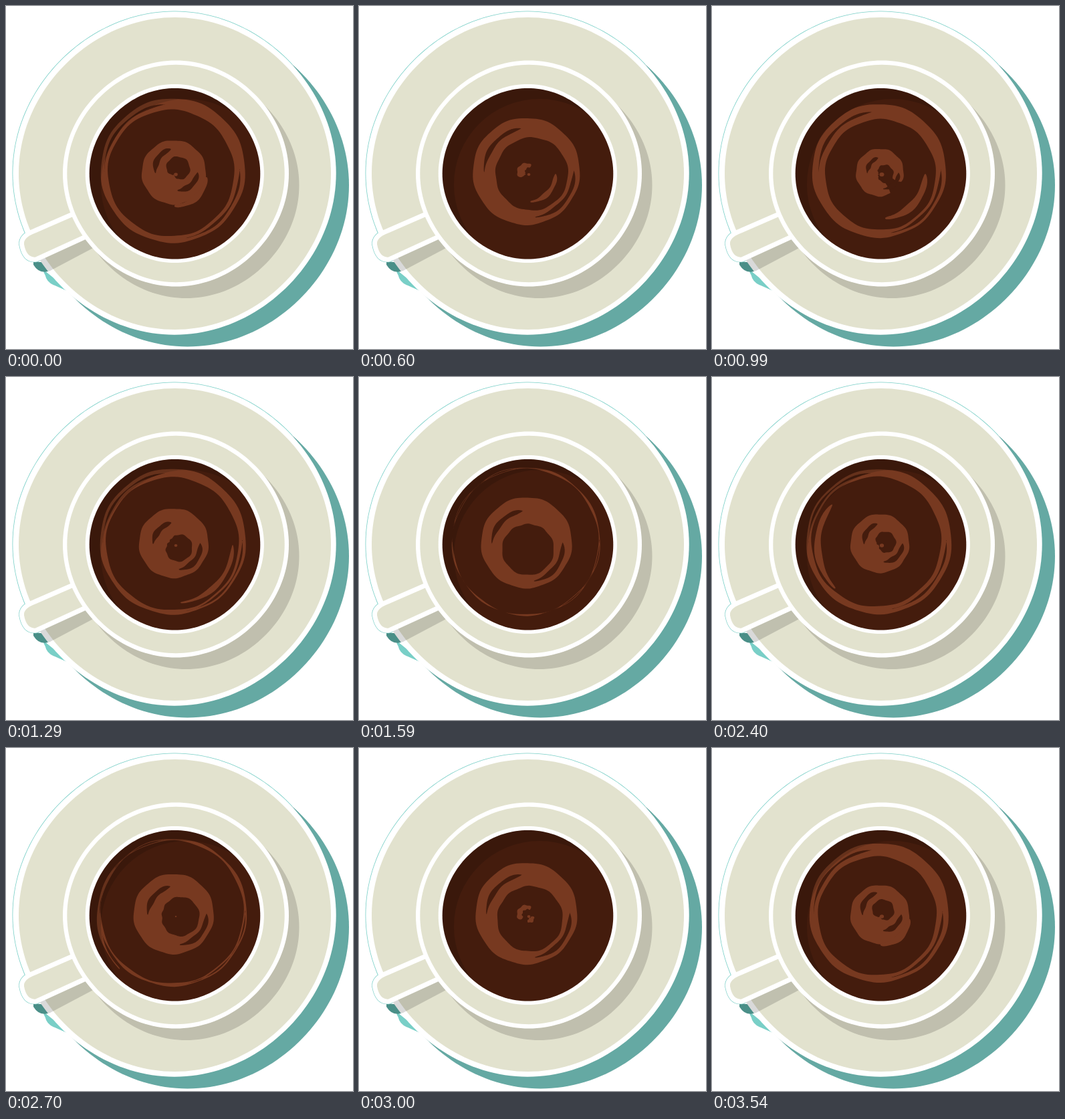
An HTML page with a canvas that plays this animation: 519x513 px, repeating every 3.57 s.

```html
<!DOCTYPE html>
<html>
<head>
<meta charset="utf-8">
<style>
html, body { margin: 0; width: 100%; height: 100%; overflow: hidden; background: #fff; }
canvas { display: block; }
</style>
</head>
<body>
<canvas id="stage" width="519" height="513"></canvas>
<script>
const ctx = document.getElementById('stage').getContext('2d');
const LOOP = 3570, STEPS = 48, LIFE = 34;
const CX = 252, CY = 251, RAD = Math.PI / 180;
const CREAM = '#e2e2ce', COFFEE = '#441c0d', FOAM = '#773920';
const TEAL = '#65a9a3', DEEP_TEAL = '#4a8f88', AQUA = '#79cfc7';

// born: step of birth; thick: heavy side of the ring in degrees;
// wisp: angle and radius of the loose arc that drifts outwards.
const swirls = [
  { born: 4, thick: 285, wisp: { angle: 42, radius: 22 } },
  { born: 21, thick: 245, wisp: { angle: 178, radius: 39 } },
  { born: 36, thick: 205, wisp: { angle: 48, radius: -12 } }
];

// Fills the area between two radius functions of u (0..1) and the angle.
function band(middle, span, outer, inner, color) {
  const N = 120, rim = [], core = [];
  for (let i = 0; i <= N; i++) {
    const u = i / N, a = (middle + span * (u - 0.5)) * RAD;
    const at = r => [CX + r * Math.cos(a), CY + r * Math.sin(a)];
    const handDrawn = 0.7 * Math.sin(9 * a);
    rim.push(at(Math.max(0, outer(u, a) + handDrawn)));
    core.unshift(at(Math.max(0, inner(u, a) - handDrawn)));
  }
  ctx.beginPath();
  for (const p of rim.concat(core)) ctx.lineTo(...p);
  ctx.fillStyle = color;
  ctx.fill();
}

// A crescent with pointed ends around a radius function.
function crescent(middle, span, radius, width, color) {
  const half = u => width / 2 * Math.sqrt(Math.sin(Math.PI * u));
  band(middle, span, (u, a) => radius(a) + half(u), (u, a) => radius(a) - half(u), color);
}

function drawSwirl({ thick, wisp }, age) {
  const size = Math.min(4 * age, 108 + (age - 27) / 2);
  const weight = Math.min(0.7 * size, 34 * Math.sin(Math.PI * (age / LIFE) ** 0.6));
  const heavy = (thick + 9 * (age - 20)) * RAD;
  const opening = Math.min(1, age / 10);

  // ring: a short arc that closes while it grows
  const outer = a => size * (1 + 0.05 * Math.cos(a - 245 * RAD));
  const depth = a => weight * (1 + 0.35 * Math.cos(a - heavy));
  const middle = a => outer(a) - depth(a) / 2;
  const taper = u => Math.max(0, Math.sin(Math.PI * u)) ** (0.5 * (1 - opening));
  const half = (u, a) => depth(a) / 2 * taper(u);
  band(222, 360 * opening,
    (u, a) => middle(a) + half(u, a), (u, a) => middle(a) - half(u, a), FOAM);

  // two slits split the ring at the upper left and lower right
  if (age > 7) {
    crescent(222, 80, middle, weight * 0.26, COFFEE);
    crescent(38, 84, middle, weight * 0.26, COFFEE);
  }

  if (age < 17) {
    const fade = Math.sin(Math.PI * age / 17);
    crescent(wisp.angle, 84, () => wisp.radius + 5 * age, 11 * fade, FOAM);
    disc(CX + 2, CY + 1, 3.5 * fade, 3 * fade, FOAM);
  }
}

function disc(x, y, rx, ry, color) {
  ctx.beginPath();
  ctx.ellipse(x, y, rx, ry, 0, 0, 7);
  ctx.fillStyle = color;
  ctx.fill();
}

// Hand-cut circle, slightly flat along the diagonals.
function oval(x, y, r) {
  const path = new Path2D();
  for (let deg = 0; deg < 360; deg += 2) {
    const a = deg * RAD, q = r * (1 - 0.005 * (1 - Math.cos(4 * a)));
    path.lineTo(x + q * Math.cos(a), y + q * Math.sin(a));
  }
  path.closePath();
  return path;
}

function paint(path, fill, stroke, width) {
  if (stroke) {
    ctx.strokeStyle = stroke;
    ctx.lineWidth = width;
    ctx.lineJoin = 'round';
    ctx.stroke(path);
  }
  if (fill) {
    ctx.fillStyle = fill;
    ctx.fill(path);
  }
}

const saucer = oval(252, 250, 241.7);
const coffee = oval(252.5, 250.7, 127.8);
const handle = new Path2D('M112 306L42 336.5Q22 344 23.5 357Q28 381 45 379L128 341');
const handleShade = new Path2D('M44 382L116 347L134 360L66 396Q50 402 44 382Z');

function drawCup() {
  ctx.fillStyle = '#fff';
  ctx.fillRect(0, 0, 519, 513);

  // saucer and what it casts
  paint(oval(271.5, 268, 241.5), TEAL);
  paint(new Path2D('M58 398L90 424L72 416Q62 412 60 402Z'), AQUA, AQUA, 3);
  paint(new Path2D('M41 382L62 384L66 396Q50 402 41 387Z'), DEEP_TEAL);
  ctx.save();
  ctx.beginPath();
  ctx.moveTo(430, 85);
  ctx.lineTo(430, 0);
  ctx.lineTo(0, 0);
  ctx.lineTo(0, 345);
  ctx.lineTo(60, 345);
  ctx.clip();
  paint(saucer, null, AQUA, 1.6);
  ctx.restore();
  paint(handle, null, AQUA, 8.4);
  paint(saucer, '#fff');
  paint(oval(252.5, 250.5, 233.5), CREAM);

  // shadows lying on the saucer
  ctx.save();
  ctx.clip(saucer);
  paint(oval(269.5, 268, 169), '#c0bfae');
  paint(handleShade, 'rgba(0,0,0,.15)');
  ctx.restore();

  // handle, cup, coffee
  paint(handle, CREAM);
  paint(handle, null, '#fff', 7);
  paint(oval(254, 250.5, 169), '#fff');
  paint(oval(254, 250.5, 162.7), CREAM);
  paint(oval(252.3, 250.5, 133.6), '#fff');
  paint(coffee, COFFEE);
}

function frame(now) {
  const t = now % LOOP;
  const step = Math.floor(t / 150) * 2 + (t % 150 >= 90 ? 1 : 0);
  drawCup();

  ctx.save();
  ctx.clip(coffee);
  const age = s => (step - s.born + STEPS) % STEPS;
  const alive = swirls.filter(s => age(s) > 0 && age(s) < LIFE);
  alive.sort((a, b) => age(b) - age(a));
  for (const s of alive) drawSwirl(s, age(s));

  // shade of the rim
  ctx.beginPath();
  ctx.rect(100, 100, 320, 320);
  ctx.arc(270, 267, 128, 0, 7);
  ctx.fillStyle = 'rgba(0,0,0,.15)';
  ctx.fill('evenodd');
  ctx.restore();

  requestAnimationFrame(frame);
}
requestAnimationFrame(frame);
</script>
</body>
</html>
```
